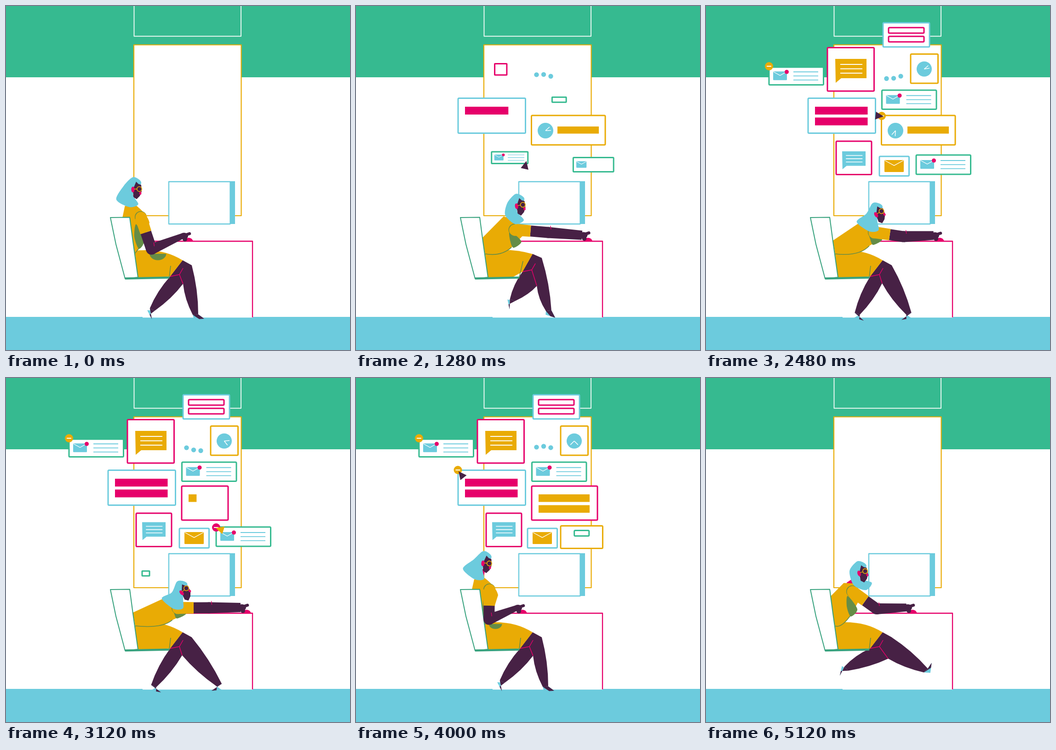
An HTML page with a canvas for the animation above (5200 ms loop, 748 by 748 pixels).

```html
<!DOCTYPE html>
<html lang="en">
<head>
<meta charset="utf-8">
<title>Busy desk</title>
<style>
  html, body { margin: 0; height: 100%; overflow: hidden; background: #fff; }
  canvas { display: block; width: 100vw; height: 100vh; }
</style>
</head>
<body>
<canvas id="stage" width="748" height="748"></canvas>
<script>
const c = document.getElementById('stage').getContext('2d');
const GREEN = '#36ba90', BLUE = '#6ccbdd', GOLD = '#e9ab05', PINK = '#e6006a',
      DARK = '#472145', OLIVE = '#658d47', CHAIR = '#38a27e', WHITE = '#fff';
const LOOP = 5200, STEP = 80, CLEAR = 4880;
let t = 0;

const clamp = v => Math.max(0, Math.min(1, v));
const ramp = (start, span) => clamp((t - start) / span);
const ease = v => v * v * (3 - 2 * v);
const rad = deg => deg * Math.PI / 180;
const add = ([x, y], dx, dy) => [x + dx, y + dy];
const polar = (p, r, deg) => add(p, r * Math.cos(rad(deg)), r * Math.sin(rad(deg)));
const mix = (a, b, f) => Array.isArray(a) ? a.map((v, i) => mix(v, b[i], f)) : a + (b - a) * f;
const mid = (a, b) => mix(a, b, .5);

// Blend between [time, pose] keys; a pose is an object of numbers and points.
function blend(keys) {
  const i = keys.findIndex(k => t < k[0]);
  if (i === 0) return keys[0][1];
  if (i < 0) return keys.at(-1)[1];
  const [[t0, a], [t1, b]] = [keys[i - 1], keys[i]];
  const f = ease((t - t0) / (t1 - t0)), pose = {};
  for (const k in a) pose[k] = mix(a[k], b[k], f);
  return pose;
}

// ---- drawing helpers ----
function fill(color) { c.fillStyle = color; c.fill(); }
function stroke(color, width = 2) { c.strokeStyle = color; c.lineWidth = width; c.stroke(); }
function box(x, y, w, h, color) { c.fillStyle = color; c.fillRect(x, y, w, h); }
function trace(pts, close) {
  c.beginPath();
  pts.forEach(p => c.lineTo(...p));
  if (close) c.closePath();
}
function poly(color, ...pts) { trace(pts, true); fill(color); }
function line(color, width, ...pts) { trace(pts); stroke(color, width); }
function oval(x, y, rx, ry, color, from = 0, to = 2 * Math.PI) {
  c.beginPath();
  c.ellipse(x, y, rx, ry, 0, from, to);
  fill(color);
}
function blob(color, pts) {
  const n = pts.length, at = i => pts[(i + n) % n];
  c.beginPath();
  c.moveTo(...pts[0]);
  for (let i = 0; i < n; i++) {
    const [a, b, d, e] = [at(i - 1), at(i), at(i + 1), at(i + 2)];
    c.bezierCurveTo(b[0] + (d[0] - a[0]) / 7, b[1] + (d[1] - a[1]) / 7,
                    d[0] - (e[0] - b[0]) / 7, d[1] - (e[1] - b[1]) / 7, ...d);
  }
  fill(color);
}
function normal(a, b, r) {
  const dx = b[0] - a[0], dy = b[1] - a[1], k = r / Math.hypot(dx, dy);
  return [dy * k, -dx * k];
}
function limb(color, a, b, ra, rb) {
  const [x, y] = normal(a, b, 1);
  poly(color, add(a, x * ra, y * ra), add(b, x * rb, y * rb),
              add(b, -x * rb, -y * rb), add(a, -x * ra, -y * ra));
}

// ---- woman: a few key points, the rest of the body follows from them ----
const upper = (head, tilt, sway, shoulder, hand) => ({ head, tilt, sway, shoulder, hand });
const UPPER = [
  [400, upper([276, 399], 0, 102, [293, 459], [384, 500])],
  [800, upper([364, 449], 16, 90, [348, 495], [480, 499])],
  [1680, upper([338, 425], -28, 98, [342, 480], [500, 498])],
  [2480, upper([370, 454], -30, 113, [365, 492], [495, 499])],
  [3120, upper([382, 467], -40, 117, [373, 500], [510, 499])],
  [4000, upper([276, 403], 5, 118, [290, 460], [349, 500])],
  [4880, upper([333, 425], -17, 68, [318, 464], [436, 499])],
];
const legs = (lift, front, toeF, back, toeB) => ({ lift, front, toeF, back, toeB });
const SIT = legs(0, [412, 671], 25, [318, 660], 92);
const STEPPED = legs(0, [441, 669], 140, [329, 669], 47);
const LEGS = [
  [400, SIT],
  [800, legs(0, [449, 671], 30, [288, 618], 150)],
  [1680, legs(1, [396, 656], 60, [380, 656], 75)],
  [2080, STEPPED], [2640, STEPPED],
  [3120, legs(0, [464, 668], 145, [321, 670], 40)],
  [4000, SIT],
  [4880, legs(0, [478, 636], -53, [305, 632], 132)],
];

function drawLeg(hip, knee, ankle, crook, toeAngle, side, heelSide) {
  const [x, y] = normal(knee, ankle, side);
  const out = add(ankle, x * 6, y * 6), inn = add(ankle, -x * 6, -y * 6);
  const toe = polar(ankle, 21, toeAngle), heel = polar(ankle, 11, toeAngle + 80 * heelSide);
  poly(BLUE, inn, heel, toe, out);
  poly(DARK, out, inn, mid(heel, toe), toe);
  c.beginPath();
  c.moveTo(...hip);
  c.lineTo(...knee);
  c.quadraticCurveTo(...add(mid(knee, out), x * 7, y * 7), ...out);
  c.lineTo(...inn);
  c.quadraticCurveTo(...add(mid(inn, crook), -x * 7, -y * 7), ...crook);
  fill(DARK);
}

function drawLegs() {
  const { lift, front, toeF, back, toeB } = blend(LEGS);
  const hem = [384, 553 - 24 * lift], low = [357 + 9 * lift, 588 - 18 * lift];
  const knee = [404, 564 - 28 * lift], raise = clamp((665 - back[1]) / 45);
  const crook = [383 + 18 * raise, 603 + 10 * raise];
  drawLeg(hem, low, back, crook, toeB, -1, 1);
  drawLeg(hem, knee, front, crook, toeF, 1, Math.sign(90 - toeF));
  poly(DARK, hem, knee, crook, low);
  const seam = add(low, 20, -4);
  line(PINK, 1.5, low, seam, add(seam, 8, -14));
  line(PINK, 1.5, seam, crook);

  c.beginPath();
  c.moveTo(280, 532);
  c.quadraticCurveTo(342, 526, ...hem);
  c.lineTo(...low);
  c.lineTo(340, 590);
  c.lineTo(286, 590);
  fill(GOLD);
  line(OLIVE, 1.6, [355, 590], add(low, 1, -23));
}

function drawTorso({ head, shoulder }) {
  const lean = (shoulder[0] - 291) / 80, up = 1 - lean, bent = clamp(lean * 1.35);
  const neck = mid(head, shoulder), nape = add(neck, -26, 6 - 14 * lean);
  const throat = add(neck, -5, 2), chest = add(shoulder, 19, 12);
  const waist = add(shoulder, 3 - 14 * lean, 61 - 34 * lean);
  const hemline = () => c.quadraticCurveTo(waist[0] - 22, 545, 281, 539);

  line(PINK, 15, add(head, -2, 12), add(mid(nape, throat), 0, 5));
  c.beginPath();
  c.moveTo(281, 539);
  c.lineTo(252 + 24 * bent, 460 + 50 * bent);
  c.lineTo(...nape);
  c.lineTo(...throat);
  c.quadraticCurveTo(...add(chest, -4, -18), ...chest);
  c.lineTo(...waist);
  hemline();
  fill(GOLD);
  blob(OLIVE, [add(shoulder, -10, 18 * up - 2), add(shoulder, -14 + 7 * lean, 44 - 30 * lean),
               add(waist, 17 * lean - 7, 9 - 12 * lean), add(chest, -12 * up, 40 * up)]);
  c.beginPath();
  c.moveTo(...waist);
  hemline();
  stroke(OLIVE, 1.6);
}

function drawChair() {
  trace([[227, 460], [269, 459.5], [276, 512], [287, 590], [259, 593], [239, 518]], true);
  fill(WHITE);
  stroke(CHAIR, 2);
  line(CHAIR, 4.5, [259, 592.5], [355, 590.5]);
}

function drawArm({ shoulder, hand }) {
  const reach = Math.hypot(hand[0] - shoulder[0], hand[1] - shoulder[1]);
  const bend = clamp((133 - reach) / 25);
  const [nx, ny] = normal(shoulder, hand, -54 * bend);
  const elbow = add(mid(shoulder, hand), nx, ny);
  const upperArm = Math.hypot(elbow[0] - shoulder[0], elbow[1] - shoulder[1]);
  const cuff = mix(shoulder, elbow, 35 / upperArm);
  const shade = clamp((elbow[1] - 512) / 16);
  oval(elbow[0] + 14, elbow[1] + 10, 18 * shade, 14 * shade, OLIVE, 0, Math.PI);
  oval(hand[0] + 13, 512, 9.5, 8, PINK, Math.PI, 2 * Math.PI);
  limb(DARK, cuff, elbow, 12, 12);
  oval(...elbow, 12, 12, DARK);
  limb(DARK, elbow, hand, 12, 10 - 4 * bend);
  oval(hand[0] + 3, hand[1], 9, 7, DARK);
  oval(hand[0] + 5, hand[1] + 7, 5, 5, DARK);
  c.lineCap = 'round';
  line(DARK, 6.5, hand, add(hand, 15, -5));
  line(PINK, 1.3, add(elbow, 6, -7), add(elbow, 5, -14));
  oval(...shoulder, 13, 13, OLIVE);
  oval(...add(shoulder, .8, .8), 12.5, 12.5, GOLD);
  limb(GOLD, shoulder, cuff, 13, 12.5);
}

function drawHead({ head, tilt, sway }) {
  const spin = ([x, y], deg) => polar(head, Math.hypot(x, y), deg + Math.atan2(y, x) / rad(1));
  const skull = (x, y) => spin([x, y], tilt / 2);
  const tipLength = 24 + 17 * clamp((sway - 92) / 12);
  blob(BLUE, [skull(18, -13), skull(10, -24), skull(-2, -26), skull(-20, -8),
              polar(head, tipLength + 4, sway + 47), polar(head, 39, sway),
              polar(head, 34, sway - 32), skull(0, 10)]);
  poly(DARK, skull(7, -17), skull(12, -12), skull(18, -10), skull(19, 4), skull(15, 14),
             skull(8, 21), skull(1, 16), skull(0, 0));
  c.save();
  c.translate(...head);
  c.rotate(rad(tilt));
  oval(0, 0, 3.6, 6.3, PINK);
  oval(16, 8, 2.4, 3.4, PINK);
  c.beginPath();
  c.arc(14, -1, 5.3, 0, 7);
  stroke(GOLD, 1.6);
  line(GOLD, 1.3, [3, -1], [8.5, -1]);
  c.restore();
}

// ---- floating windows ----
function card(x, y, w, h, color, start, end, draw, { spin = 0, rise = 0 } = {}) {
  const s = ease(ramp(start, 240)) * (1 - ramp(end, 240));
  if (s <= 0.02) return;
  c.save();
  c.translate(x + w / 2, y + h / 2 + (1 - s) * rise);
  c.rotate((1 - s) * spin);
  c.scale(s, s);
  c.translate(-x - w / 2, -y - h / 2);
  c.beginPath();
  c.roundRect(x, y, w, h, 2);
  fill(WHITE);
  stroke(color, 3 / Math.max(s, 0.25));
  if (s > 0.4) draw(s);
  c.restore();
}
function envelope(x, y, w, h, color) {
  c.beginPath();
  c.roundRect(x, y, w, h, 1.5);
  fill(color);
  line(WHITE, 1.4, [x + 1, y + 1], [x + w / 2, y + h * .46], [x + w - 1, y + 1]);
}
function rows(x, y, w, gap, start) {
  for (let i = 0; i < 3; i++) {
    const u = ramp(start + i * 120, 130);
    if (u) line(BLUE, 1.8, [x, y + i * gap], [x + w * u, y + i * gap]);
  }
}
function mail(x, y, h, start, end, typing) {
  const cy = y + h / 2;
  card(x, y, 118.5, h, GREEN, start, end, () => {
    envelope(x + 9, cy - 10, 30, 19, BLUE);
    const dot = 4.5 * ramp(typing, 80);
    oval(x + 38.5, cy - 9, dot, dot, PINK);
    rows(x + 53, cy - 9, 54, 8.8, typing);
  });
}
function chat(x, y, s, color, start) {
  c.save();
  c.translate(x, y + 5 * (1 - ramp(start + 560, 160)));
  c.scale(s, s);
  poly(color, [0, 0], [68, 0], [68, 42], [13, 42], [1, 52]);
  for (let i = 0; i < 3; i++) line(WHITE, 2.2, [11, 12 + i * 9.5], [59, 12 + i * 9.5]);
  c.restore();
}
function solidBars(x, y, w, h, color, start, span) {
  for (let i = 0; i < 2; i++) box(x, y + i * 23.5, w * ramp(start + i * span, span), h, color);
}
function openBars(cx, y, color, start) {
  for (let i = 0; i < 2; i++) {
    const w = 77 * ramp(start + i * 108, 300);
    if (w < 12) continue;
    c.beginPath();
    c.roundRect(cx - w / 2, y + i * 19, w, 12, 2);
    stroke(color, 3);
  }
}
function clock(x, y, r, ...hands) {
  oval(x, y, r, r, BLUE);
  hands.forEach(deg => line(WHITE, 1.5, [x, y], polar([x, y], r * .7, deg)));
}
function badge(x, y, start, end, color = GOLD) {
  if (t >= end) return;
  const r = 9 * ramp(start, 120) * (1 - ramp(CLEAR, 240));
  oval(x, y, r, r, color);
  if (r) line(WHITE, 2, [x - r * .55, y], [x + r * .55, y]);
}
function dots() {
  const r = 5.2 * ramp(480, 240) * (1 - ramp(CLEAR, 240));
  for (let i = 0; i < 3; i++) {
    const a = t / 2600 * 2 * Math.PI + 2.25 - i * Math.PI / 3;
    oval(392.5 + i * 15.5, 153.3 + 4.8 * Math.sin(a), r, r, BLUE);
  }
}

function drawCards() {
  const since = t - 1680;
  dots();
  mail(275, 310.5, 38.5, 400, 1200, 760);
  card(222, 200.5, 146.5, 76, BLUE, 800, CLEAR, () => solidBars(237, 219, 114.5, 17, PINK, 1000, 340));
  card(381.5, 238, 160.5, 64, GOLD, 680, 2800, () => {
    clock(412, 271, 17, 3 + since * .1125, 42 + since * .1125);
    box(438, 262, 90, 15.5, GOLD);
  }, { spin: .2 });
  card(264, 90.5, 101.5, 94.5, PINK, 1200, CLEAR, () => chat(281, 115, 1, GOLD, 1200));
  mail(457, 324, 42, 1120, 3480, 1420);
  mail(382.5, 183, 41.5, 1200, CLEAR, 1490);
  card(385, 36.5, 101, 52.5, BLUE, 1360, CLEAR, () => openBars(435.5, 47, PINK, 1440));
  card(313, 306, 41.5, 42, GREEN, 1280, 1760, () => rows(328, 318, 11, 9, 1360));
  card(445, 104.5, 59.5, 63.5, GOLD, 1520, CLEAR, s =>
    clock(474.5, 137, 16.5 / s, since * .056 - 85, since * .095 - 85), { spin: .25 });
  const tall = 29 + 9.5 * ramp(1680, 160);
  mail(137, 176 - 4.5 * ramp(1680, 160) - tall, tall, 1440, CLEAR, 1720);
  card(283, 294, 77, 72.5, PINK, 1840, CLEAR, () => chat(296, 313.5, .75, BLUE, 1840));
  const ex = 377 - 4 * ramp(3680, 240);
  card(ex, 327, 64.5, 42.5, BLUE, 1600, CLEAR, () => envelope(ex + 11, 335, 42, 26, GOLD), { rise: 21 });
  const wide = 143 * ramp(2880, 340);
  if (wide) card(382, 235, wide, 74, PINK, 2640, CLEAR, () => solidBars(397, 253, 111, 16.5, GOLD, 3070, 320));
  card(273, 405, 62, 40, GREEN, 3040, 3440, () => rows(287, 416, 34, 9, 3240));
  const w = 111 * ramp(3720, 340) + 40 * ramp(4480, 320);
  if (w) card(445, 321.5, w, 49, GOLD, 3480, CLEAR, () => openBars(445 + w / 2, 331.5, GREEN, 3875));
  badge(313, 307, 1480, 1800);
  badge(137, 131, 1960, LOOP);
  badge(382, 239, 2360, 2840);
  badge(457, 325, 2960, 3520, PINK);
  badge(221.5, 200, 3840, LOOP);
}

const aim = (tip, turn) => ({ tip, turn });
const CURSOR = [
  [800, aim([488, 391], 72)], [1680, aim([281, 296], 126)], [2000, aim([140, 131], 150)],
  [2480, aim([386, 240], 186)], [3120, aim([456, 326], 17)], [4000, aim([223, 203], 52)],
  [4880, aim([560, 340], 72)],
];
function drawCursor() {
  if (t < 720 || t > CLEAR) return;
  const { tip, turn } = blend(CURSOR);
  const pressed = Math.abs(t - 3160) <= 120;
  poly(pressed ? GOLD : DARK, tip, polar(tip, 19.5, turn - 26), polar(tip, 19.5, turn + 26));
}

function drawRoom() {
  box(0, 0, 748, 748, WHITE);
  box(0, 0, 748, 155, GREEN);
  box(0, 676, 748, 72, BLUE);
  box(297, 676, 240, 1.5, WHITE);
  line('#e8f7f1', 2, [278.5, 0], [278.5, 65.7], [511, 65.7], [511, 0]);
  c.beginPath();
  c.rect(278, 84.5, 233.5, 371.5);
  fill(WHITE);
  stroke(GOLD, 2.2);
}

function drawDesk() {
  c.beginPath();
  c.rect(354, 382, 133.5, 92);
  fill(WHITE);
  stroke(BLUE, 2.3);
  box(487, 381, 11, 93, BLUE);
  line(PINK, 2.3, [315, 511.5], [536, 511.5], [536, 677]);
}

function draw(now) {
  t = Math.floor(now % LOOP / STEP) * STEP;
  if (t < 480) t = 0;
  c.lineJoin = 'round';
  c.lineCap = 'butt';
  drawRoom();
  drawCards();
  drawDesk();
  drawCursor();
  const pose = blend(UPPER);
  drawLegs();
  drawTorso(pose);
  drawChair();
  drawArm(pose);
  drawHead(pose);
  requestAnimationFrame(draw);
}
requestAnimationFrame(draw);
</script>
</body>
</html>
```
